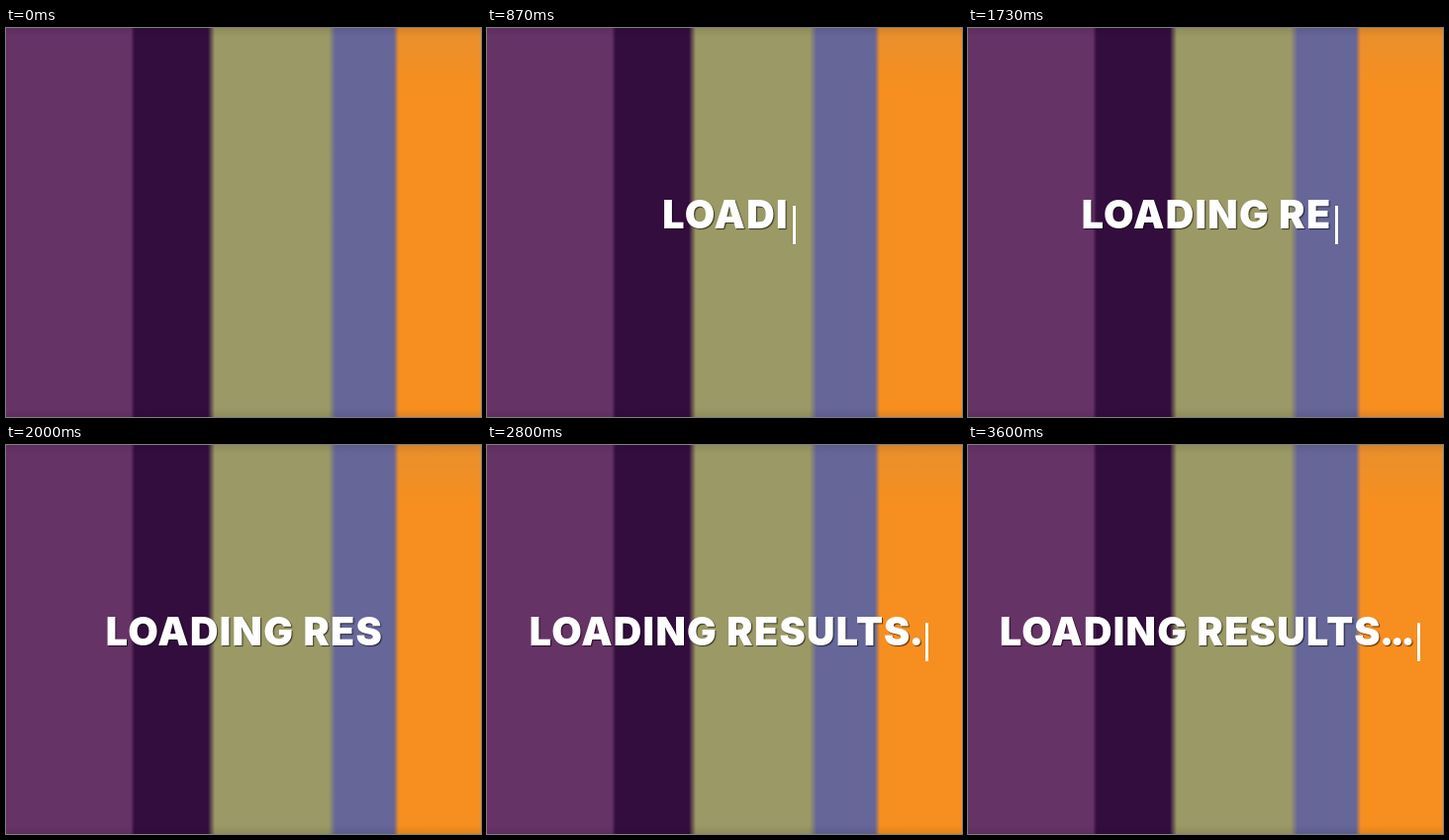
Animation, 480 px wide and 394 px high, one loop 3.99 s. Source, as an HTML page without scripts:

```html
<!DOCTYPE html>
<html lang="en">
<head>
<meta charset="utf-8">
<title>Loading results</title>
<style>
@property --n { syntax: "<integer>"; inherits: true; initial-value: 0; }

html, body { margin: 0; width: 100%; height: 100%; overflow: hidden; }

.stage {
  position: relative;
  width: 480px;
  height: 394px;
  overflow: hidden;
  background:
    linear-gradient(rgba(0,0,0,.09), transparent 9px, transparent 385px, rgba(0,0,0,.09)),
    linear-gradient(rgba(150,145,120,.14), transparent 60px) right / 85px 100% no-repeat,
    linear-gradient(90deg,
      #663366 126px, #320d3d 130px,
      #320d3d 204px, #9b9965 211px,
      #9b9965 326px, #666699 333px,
      #666699 392px, #f68f20 397px);
}

.line {
  position: absolute;
  top: 139.3px;
  left: 0;
  width: 482px;
  display: flex;
  justify-content: center;
  font: 900 39.5px/100px Inter, "Open Sans", sans-serif;
  font-optical-sizing: none;
  color: #fff;
  text-shadow: 1px 1px 1px rgba(0,0,0,.65);
}

.text {
  position: relative;
  white-space: pre;
  animation: type 3990ms step-end infinite;
}

/* a letter has its size only once the count passes its index */
.text span {
  font-size: calc(clamp(0, var(--n) - var(--i), 1) * 39.5px);
  letter-spacing: .032em;
  line-height: 0;
}

.text .dot { margin-left: -.05em; letter-spacing: -.05em; }

.text::after {
  content: "";
  position: absolute;
  left: 100%;
  top: 40.7px;
  width: 2.5px;
  height: 39px;
  margin-left: 4px;
  background: #fff;
  box-shadow: 0 0 1px rgba(0,0,0,.3);
  animation: blink 3990ms linear infinite;
}

@keyframes type {
  0% { --n: 0; }
  5.01% { --n: 1; }
  10.02% { --n: 2; }
  13.28% { --n: 3; }
  18.29% { --n: 4; }
  21.8% { --n: 5; }
  26.81% { --n: 6; }
  30.07% { --n: 7; }
  35.08% { --n: 8; }
  38.34% { --n: 9; }
  43.35% { --n: 10; }
  46.86% { --n: 11; }
  51.87% { --n: 12; }
  55.13% { --n: 13; }
  60.15% { --n: 14; }
  63.4% { --n: 15; }
  68.42% { --n: 16; }
  71.92% { --n: 17; }
  76.94%, 100% { --n: 18; }
}

@keyframes blink {
  0%, 11.7%, 25%, 36.7%, 50%, 61.7%, 75%, 86.7% { opacity: 0; }
  15%, 21.9%, 40%, 46.9%, 65%, 71.9%, 90%, 100% { opacity: 1; }
}
</style>
</head>
<body>
<div class="stage">
  <div class="line"><div class="text"><span style="--i:0">L</span><span style="--i:1">O</span><span style="--i:2">A</span><span style="--i:3">D</span><span style="--i:4">I</span><span style="--i:5">N</span><span style="--i:6">G</span><span style="--i:7"> </span><span style="--i:8">R</span><span style="--i:9">E</span><span style="--i:10">S</span><span style="--i:11">U</span><span style="--i:12">L</span><span style="--i:13">T</span><span style="--i:14">S</span><span class="dot" style="--i:15">.</span><span class="dot" style="--i:16">.</span><span class="dot" style="--i:17">.</span></div></div>
</div>
</body>
</html>
```
